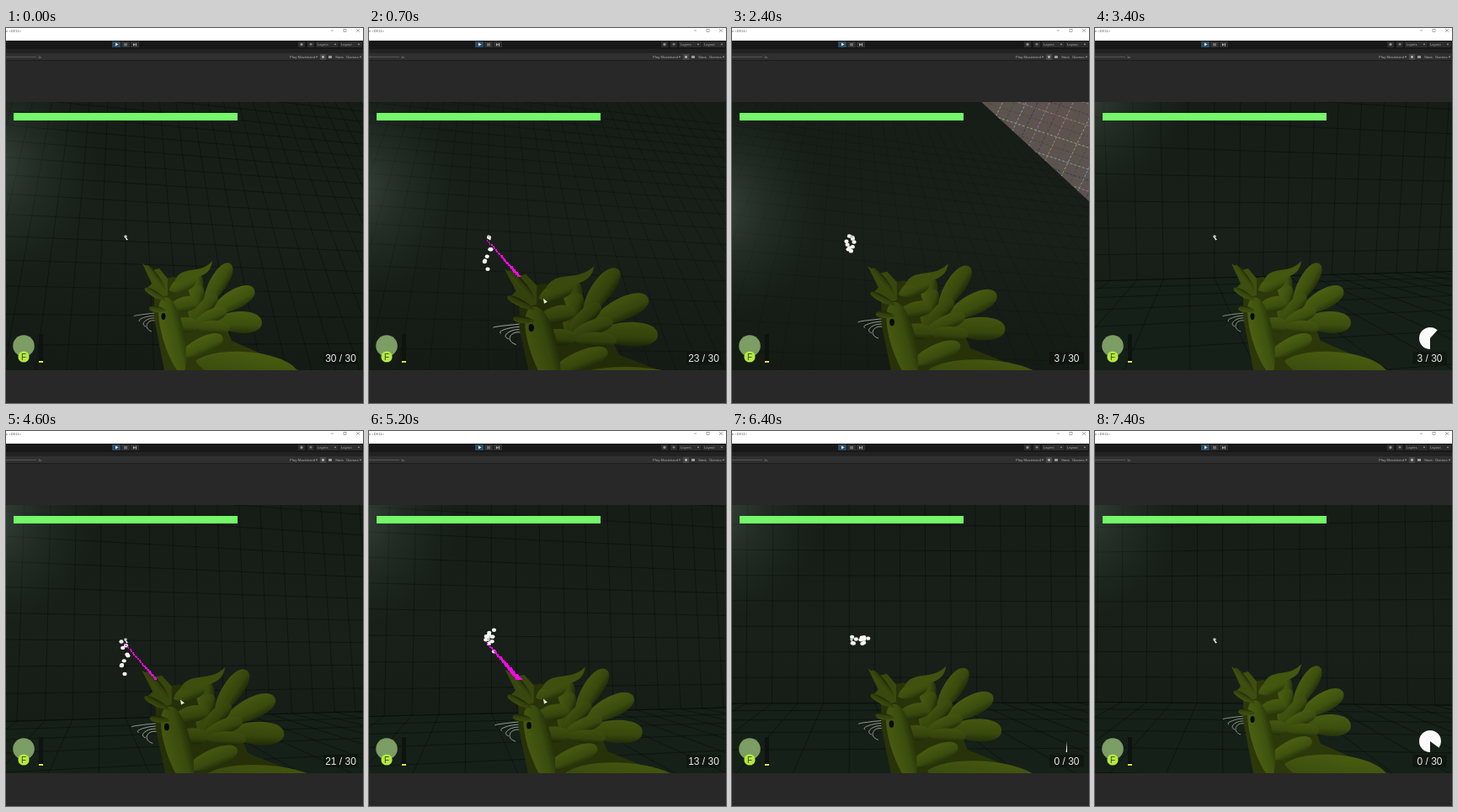
Recreate the animation shown at these times as an HTML page with a canvas. Size 424 by 446 pixels, loop 7.5 s.

```html
<!DOCTYPE html>
<html lang="en">
<head>
<meta charset="utf-8">
<title>Plant blaster</title>
<style>
html, body { margin: 0; width: 100%; height: 100%; overflow: hidden; background: #282828; }
canvas { display: block; }
</style>
</head>
<body>
<canvas id="stage" width="424" height="446"></canvas>
<script>
const c = document.getElementById('stage').getContext('2d');
const LOOP = 7500, STEP = 100, SHOT = 83.3, RELOAD = 1200, CLIP = 30;
const TOP = 88, BOTTOM = 407, CX = 142, CY = 250, FOCAL = 276;
const DEPTH = 10, FLOOR = -2.5, TILE = 1.1;

const bursts = [
  { start: 150, shots: 27, reload: 2660 },
  { start: 3865, shots: 30, reload: 6380 }
];

function ease(t, from, to) {
  const s = Math.max(0, Math.min(1, (t - from) / (to - from)));
  return s * s * (3 - 2 * s);
}

// Drift of the world on screen: recoil lifts the aim, then the player looks down
function camera(t) {
  return {
    x: 12 * (ease(t, 2400, 3300) - ease(t, 1100, 1800)) + 40 * ease(t, 4700, 7400),
    y: 66 * ease(t, 50, 1300) - 12 * ease(t, 1300, 1700) + 15 * ease(t, 1700, 2320)
      - 200 * ease(t, 2400, 3400) + 45 * ease(t, 3600, 4800) - 20 * ease(t, 4800, 5700)
  };
}

function weapon(t) {
  const b = bursts[t < bursts[1].start ? 0 : 1];
  const n = (t - b.start) / SHOT;
  const firing = n >= 0 && n < b.shots;
  const phase = n - Math.floor(n);
  const fired = Math.max(0, Math.min(b.shots, Math.floor(n) + 1));
  const reload = (t - b.reload) / RELOAD;
  let kick = 0;
  if (firing) kick = 0.5 + 0.5 * Math.sin(Math.PI * phase) ** 2;
  else if (n > 0) kick = Math.max(0, 0.5 - (n - b.shots) / 4);
  return { firing, phase, kick, reload: reload < 1 ? reload : 0, ammo: reload < 1 ? CLIP - fired : CLIP };
}

function trace(points) {
  c.beginPath();
  points.forEach(p => c.lineTo(...p));
  c.closePath();
}

function poly(points, fill) {
  trace(points);
  c.fillStyle = fill;
  c.fill();
}

function oval(x, y, rx, ry, fill) {
  c.beginPath();
  c.ellipse(x, y, rx, ry, 0, 0, 7);
  c.fillStyle = fill;
  c.fill();
}

function rect(x, y, w, h, fill) {
  c.fillStyle = fill;
  c.fillRect(x, y, w, h);
}

function text(s, x, y, size, fill, align = 'left') {
  c.font = size + 'px "Liberation Sans", Arial, sans-serif';
  c.textAlign = align;
  c.fillStyle = fill;
  c.fillText(s, x, y);
}

function line(x1, y1, x2, y2) {
  c.beginPath();
  c.moveTo(x1, y1);
  c.lineTo(x2, y2);
  c.stroke();
}

function room(cam) {
  const yaw = cam.x / FOCAL - 0.11, pitch = cam.y / FOCAL + 0.4;
  const sy = Math.sin(yaw), cy = Math.cos(yaw), sp = Math.sin(pitch), cp = Math.cos(pitch);
  const turn = ([x, y, z]) => {
    const d = z * cy - x * sy;
    return [x * cy + z * sy, y * cp - d * sp, d * cp + y * sp];
  };
  const flat = p => [CX + FOCAL * p[0] / p[2], CY - FOCAL * p[1] / p[2]];
  const near = (a, b) => {
    if (a[2] >= 0.3) return a;
    const s = (0.3 - a[2]) / (b[2] - a[2]);
    return a.map((v, i) => v + (b[i] - v) * s);
  };
  const seam = (a, b) => {
    a = turn(a); b = turn(b);
    if (Math.max(a[2], b[2]) > 0.3) line(...flat(near(a, b)), ...flat(near(b, a)));
  };

  const wall = c.createLinearGradient(0, TOP, 0, BOTTOM);
  wall.addColorStop(0, '#161d17');
  wall.addColorStop(0.5, '#19201a');
  wall.addColorStop(1, '#141b15');
  rect(0, TOP, 424, BOTTOM - TOP, wall);

  const a = flat(turn([-5, FLOOR, DEPTH])), b = flat(turn([10, FLOOR, DEPTH]));
  const edge = x => a[1] + (b[1] - a[1]) / (b[0] - a[0]) * (x - a[0]);
  poly([[0, edge(0)], [424, edge(424)], [424, 900], [0, 900]], '#152018');

  // Fast recoil smears the tile seams
  c.lineWidth = 1;
  c.strokeStyle = `rgba(5,10,7,${0.48 - 0.0045 * Math.max(0, cam.y)})`;
  for (let i = -9; i <= 18; i++) {
    const u = i * TILE;
    seam([u, FLOOR, DEPTH], [u, 22, DEPTH]);
    seam([u, FLOOR, DEPTH], [u, FLOOR, 0]);
  }
  for (let i = 0; i < 20; i++) {
    const d = i * TILE;
    seam([-10, FLOOR + d, DEPTH], [21, FLOOR + d, DEPTH]);
    if (i < 9) seam([-10, FLOOR, DEPTH - d], [21, FLOOR, DEPTH - d]);
  }

  const gy = 165 + cam.y * 0.7;
  const glow = c.createRadialGradient(-25, gy, 5, -25, gy, 135);
  glow.addColorStop(0, 'rgba(85,104,94,.52)');
  glow.addColorStop(0.5, 'rgba(62,80,70,.25)');
  glow.addColorStop(1, 'rgba(40,56,46,0)');
  rect(0, TOP, 160, BOTTOM - TOP, glow);
}

// Lit ground that shows past the top of the wall
function beyond(t, cam) {
  if (t < 800 || t > 3200) return;
  const ref = camera(1600);
  c.save();
  c.translate((cam.x - ref.x) * 3, (cam.y - ref.y) * 3);
  trace([[216, -32], [554, 280], [760, -300]]);
  c.clip();
  rect(200, -300, 600, 600, '#5d534f');
  c.lineWidth = 1;
  c.setLineDash([3, 2]);
  for (let i = -20; i < 34; i++) {
    c.strokeStyle = `hsl(${i * 47} 22% ${i % 2 ? 26 : 56}%)`;
    line(200, i * 13, 800, i * 13 + 200);
    line(180 + i * 14, 300, 420 + i * 14, -200);
  }
  c.restore();
}

function leaf(x, y, angle, from, to, width, light) {
  const len = to - from, h = width / 2;
  c.save();
  c.translate(x, y);
  c.rotate(angle * Math.PI / 180);
  c.translate(from, 0);
  const g = c.createLinearGradient(0, -h, 0, h);
  g.addColorStop(0, `hsl(75 70% ${light}%)`);
  g.addColorStop(0.65, `hsl(77 70% ${light - 3}%)`);
  g.addColorStop(1, `hsl(78 70% ${light - 9}%)`);
  c.beginPath();
  c.moveTo(0, 0);
  c.bezierCurveTo(len * 0.2, -h * 1.3, len, -h * 1.5, len, 0);
  c.bezierCurveTo(len, h * 1.5, len * 0.2, h * 1.3, 0, 0);
  c.fillStyle = g;
  c.fill();
  c.restore();
}

function plant(k) {
  const light = 22 - 3 * k;
  const shade = d => `hsl(76 70% ${light - d}%)`;
  c.save();
  c.transform(1 + 0.3 * k, 0, 0, 1 + 0.12 * k, -50 * k, -27 * k);

  c.lineWidth = 0.7;
  c.strokeStyle = '#bcc4b2';
  for (let i = 0; i < 4; i++) {
    c.beginPath();
    c.moveTo(177, 339 + i * 3);
    c.bezierCurveTo(168, 340 + i * 2, 150 + i * 4, 342 + i * 5, 152 + i * 7, 343 + i * 6);
    c.stroke();
  }

  poly([[176, 300], [200, 296], [250, 325], [268, 372], [348, 407], [188, 407], [176, 345]], shade(9));
  leaf(225, 396, 10, 0, 125, 42, light - 1);
  for (let i = 0; i < 4; i++) {
    leaf(224, 348, -88 + 30 * i, 22, 80 * Math.min(1, 0.7 + 0.3 * i), 17 + 2.5 * i, light - i % 2);
  }
  for (let i = 0; i < 4; i++) leaf(216, 354, -72 + 25 * i, 8, 50, 15, light - 1 - i % 2);
  for (let i = 0; i < 3; i++) leaf(194, 312 + 20 * i, -25 + 14 * i, 0, 34, 17, light - i);
  leaf(206, 390, -24, 0, 56, 19, light);
  leaf(210, 414, -103, 0, 96, 25, light);

  // Head: jagged crest, curled horn and eye
  poly([[162, 280], [174, 288], [182, 286], [192, 298], [192, 318], [178, 322], [165, 312], [173, 304]], shade(4));
  for (let i = 0; i < 3; i++) leaf(190, 312 + 12 * i, -128 - 22 * i, 0, 38 - 9 * i, 7, light - 3);
  c.beginPath();
  c.moveTo(200, 302);
  c.bezierCurveTo(208, 280, 230, 295, 245, 277);
  c.bezierCurveTo(243, 298, 222, 296, 208, 303);
  c.fillStyle = shade(2);
  c.fill();
  oval(187, 343, 2.5, 4, '#070b05');
  c.restore();
}

function beam(phase) {
  const wide = 1 + 5.5 * (1 - phase);
  for (let i = 0; i < 24; i++) {
    const s = i / 23, w = 1.2 + wide * s;
    rect(Math.round(141 + 37 * s - w / 2), Math.round(252 + 42 * s), Math.round(w), 2, '#f907e8');
  }
}

function puffs(t, cam) {
  for (const b of bursts) {
    for (let i = 0; i < b.shots; i++) {
      const born = b.start + i * SHOT;
      if (born > t || t - born > 1000) continue;
      const from = camera(born);
      const x = CX + cam.x - from.x + 4 * Math.sin(i * 5.3) - 1;
      const y = CY + cam.y - from.y + 4 * Math.cos(i * 3.7) - 1;
      oval(x, y, 2.6, 2.2, '#f5f5f2');
    }
  }
}

function hud(ammo, reload) {
  rect(9, 101, 266, 9, '#74f768');
  rect(39, 364, 5, 35, '#0d130f');
  rect(39, 396, 5, 2, '#e4e743');
  oval(21, 378, 12.8, 12.8, '#7c9d63');
  oval(21, 391, 6.6, 6.6, '#b5ea42');
  text('F', 21, 394.5, 10, '#3c4a22', 'center');
  rect(377, 385, 41, 15, 'rgba(8,12,9,.4)');
  if (reload > 0) {
    c.beginPath();
    c.moveTo(398, 369);
    c.arc(398, 369, 13, Math.PI / 2, Math.PI * (0.5 + 2 * reload));
    c.fillStyle = '#fafafa';
    c.fill();
  }
  text(`${ammo} / ${CLIP}`, 397.5, 397, 12, '#e8e8e8', 'center');
}

function arrowDown(x, y) {
  poly([[x - 1.2, y - 0.8], [x + 1.2, y - 0.8], [x, y + 1]], '#aaa');
}

function editor() {
  rect(0, 0, 424, 446, '#282828');
  rect(0, 0, 424, 15, '#fff');
  rect(0, 15, 424, 10, '#171717');
  rect(0, 25, 424, 5, '#222');
  rect(0, 30, 424, 8, '#303030');
  rect(0, 38, 424, 1, '#1c1c1c');
  text('e <DX11>', 0, 5, 4, '#555');

  c.lineWidth = 0.6;
  c.strokeStyle = '#777';
  line(386, 3, 389, 3);
  c.strokeRect(401, 1.5, 3, 3);
  line(416, 1, 420, 5);
  line(420, 1, 416, 5);

  for (let i = 0; i < 3; i++) rect(126 + 11 * i, 16, 10, 7, i ? '#303030' : '#2d4c63');
  poly([[130, 17.5], [133.5, 19.5], [130, 21.5]], '#dcecf5');
  poly([[151, 18], [154, 19.7], [151, 21.5]], '#aaa');
  for (const x of [140.5, 142.5, 154]) rect(x, 18, 1, 3.5, '#aaa');

  for (const x of [347, 358]) rect(x, 16, 8, 7, '#2c2c2c');
  for (const x of [368, 396]) rect(x, 16, 27, 7, '#2c2c2c');
  oval(351, 19.5, 1.7, 1.7, '#888');
  oval(362, 19.3, 1.5, 1.5, '#777');
  text('Layers', 370, 21, 4.2, '#aaa');
  text('Layout', 398, 21, 4.2, '#aaa');
  arrowDown(391, 19.5);
  arrowDown(419, 19.5);

  rect(0, 34, 36, 1, '#555');
  text('1x', 38, 36, 4, '#999');
  text('Play Maximized', 337, 36, 4.3, '#aaa');
  rect(373, 31, 7, 7, '#484848');
  oval(376.5, 34.5, 1.4, 1.4, '#bbb');
  rect(383, 33, 4, 3, '#999');
  text('Stats', 391, 36, 4.3, '#aaa');
  text('Gizmos', 404, 36, 4.3, '#aaa');
  arrowDown(369, 34.5);
  arrowDown(421, 34.5);
}

function draw(t) {
  const cam = camera(t), w = weapon(t);
  editor();
  c.save();
  c.beginPath();
  c.rect(0, TOP, 424, BOTTOM - TOP);
  c.clip();
  room(cam);
  beyond(t, cam);
  puffs(t, cam);
  plant(w.kick);
  if (w.firing) {
    beam(w.phase);
    const y = 318 + 7 * w.kick;
    poly([[207, y - 3], [212, y + 1], [208, y + 3]], '#e6ebcf');
  }
  oval(142, 248, 1.8, 1.8, '#b9c4bf');
  poly([[141, 248], [145, 251.5], [143, 252.5]], '#f2f2f2');
  hud(w.ammo, w.reload);
  c.restore();
}

const began = performance.now();
function tick() {
  const t = (performance.now() - began) % LOOP;
  draw(Math.floor(t / STEP) * STEP);
  requestAnimationFrame(tick);
}
tick();
</script>
</body>
</html>
```
